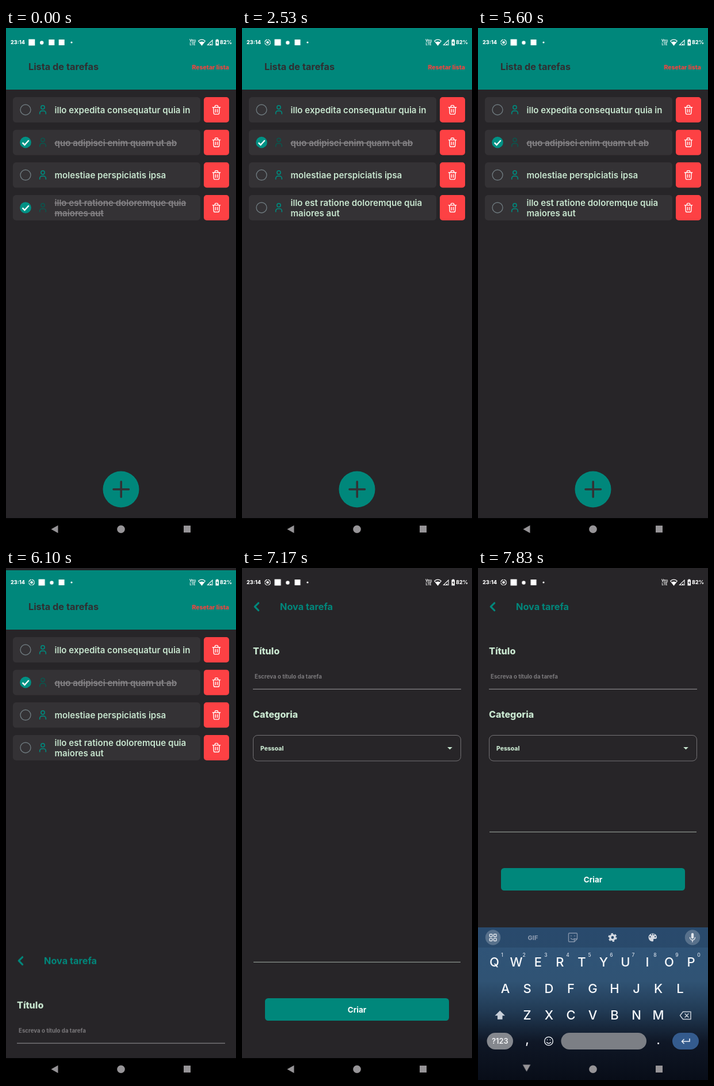
Animation of 400x889 px, one loop 8000 ms. Source, as an HTML page:

```html
<!DOCTYPE html>
<html lang="pt">
<head>
<meta charset="utf-8">
<title>Lista de tarefas</title>
<style>
  html, body { margin: 0; width: 100%; height: 100%; overflow: hidden; background: #272528; }
  svg { display: block; width: 100vw; height: 100vh; }
  text { font-family: Inter, "Open Sans", sans-serif; font-weight: 600; }
  .bold { font-weight: 700; }
  .heavy { font-weight: 800; }
  .mid { text-anchor: middle; }
  .teal { fill: #00877b; }
  .dark { fill: #272528; }
  .mint { fill: #c8e6cf; }
  .line { fill: none; stroke-linecap: round; stroke-linejoin: round; }
  .task { font-size: 15.1px; }
  .done .task { fill: #858386; text-decoration: line-through; }
  .open .task { fill: #c8e6cf; }
  .head { font-size: 16.3px; font-weight: 700; }
  .label { font-size: 16.1px; font-weight: 800; }
  .status { font-size: 9px; font-weight: 800; fill: #fff; }
  .key { font-size: 22px; font-weight: 500; fill: #f6f8fb; text-anchor: middle; }
  .num { font-size: 8.5px; font-weight: 500; fill: #d5dde8; text-anchor: middle; }

  .anim, .anim-box { animation: 8s linear infinite; }
  .anim-box { transform-box: fill-box; transform-origin: center; }

  /* status icons make room for a new one */
  .shift { animation-name: shift; }
  .appear { animation-name: appear; }
  .leave { animation-name: leave; }
  @keyframes shift {
    0%, .375% { transform: translateX(0); animation-timing-function: cubic-bezier(.4, 0, .2, 1); }
    6.6%, 100% { transform: translateX(17.3px); }
  }
  @keyframes appear {
    0%, .375% { transform: scale(0); opacity: 0; animation-timing-function: cubic-bezier(.4, 0, .2, 1); }
    6.6%, 100% { transform: scale(1); opacity: 1; }
  }
  @keyframes leave {
    0%, .375% { transform: none; opacity: 1; animation-timing-function: cubic-bezier(.4, 0, .2, 1); }
    6.6%, 100% { transform: translateX(17.3px) scale(.25); opacity: 0; }
  }

  /* last task is unchecked */
  .before { animation-name: before; }
  .after { animation-name: after; }
  @keyframes before { 0%, 31.62% { opacity: 1; } 31.625%, 100% { opacity: 0; } }
  @keyframes after { 0%, 31.62% { opacity: 0; } 31.625%, 100% { opacity: 1; } }

  /* form slides up */
  .slide { animation-name: slide; }
  .strip { animation-name: strip; }
  @keyframes slide {
    0%, 74.495% { transform: translateY(851px); animation-timing-function: cubic-bezier(.365, 0, .635, 1); }
    79.495%, 100% { transform: translateY(0); }
  }
  @keyframes strip {
    0%, 74.495% { transform: translateY(-14px); animation-timing-function: cubic-bezier(.365, 0, .635, 1); }
    79.495%, 100% { transform: translateY(0); }
  }

  /* keyboard opens */
  .resize { animation-name: resize; }
  .gap { animation-name: gap; }
  .caret { animation-name: caret; }
  .rise { animation-name: rise; }
  .fade { animation-name: fade; }
  .turn { animation-name: turn; }
  @keyframes resize { 0%, 90.4% { transform: translateY(226px); } 90.405%, 100% { transform: translateY(0); } }
  @keyframes gap { 0%, 90.4% { opacity: 0; } 90.405%, 100% { opacity: 1; } }
  @keyframes caret { 0%, 89.75% { opacity: 0; } 89.755%, 97.8% { opacity: 1; } 97.805%, 100% { opacity: 0; } }
  @keyframes rise {
    0%, 90.405% { transform: translateY(265px); animation-timing-function: cubic-bezier(0, 0, .2, 1); }
    92.905%, 100% { transform: translateY(0); }
  }
  @keyframes fade { 0%, 90.405% { opacity: 0; } 91.655%, 100% { opacity: 1; } }
  @keyframes turn {
    0%, 91.6% { transform: none; animation-timing-function: cubic-bezier(.4, 0, .2, 1); }
    94.1%, 100% { transform: translateY(-1.8px) rotate(-90deg); }
  }
</style>
</head>
<body>
<svg viewBox="0 0 400 889" preserveAspectRatio="none">
  <defs>
    <linearGradient id="sky" x1="0" y1="0" x2="0" y2="1">
      <stop offset="0" stop-color="#2f5479"/>
      <stop offset=".35" stop-color="#305374"/>
      <stop offset=".55" stop-color="#213a54"/>
      <stop offset=".75" stop-color="#0f1726"/>
      <stop offset="1" stop-color="#080d18"/>
    </linearGradient>
    <g id="person" class="line" stroke-width="1.7">
      <circle cx="64" cy="-4.3" r="3.1"/>
      <path d="M58.7 7v-1.2a4 4 0 0 1 4-4h2.6a4 4 0 0 1 4 4V7"/>
    </g>
    <g id="trash">
      <rect x="344" y="-22" width="44" height="44" rx="5" fill="#fd4144"/>
      <path class="line" stroke="#fff" stroke-width="1.4" d="M359.3-4.3h13.4M363.4-4.6v-1.6q0-1.4 1.4-1.4h2.4q1.4 0 1.4 1.4v1.6M360.8-4l.5 9.7q.1 1.9 2 1.9h5.4q1.9 0 2-1.9l.5-9.7M364.4-.8v5M367.6-.8v5"/>
    </g>
    <circle id="off" cx="34" r="9" fill="none" stroke="#6d787d" stroke-width="1.4"/>
    <g id="on">
      <circle cx="34" r="9.8" fill="#009184"/>
      <path d="M28.6.4l3.8 3.9 7.3-8" fill="none" stroke="#fff" stroke-width="2.4"/>
    </g>
  </defs>

  <!-- list -->
  <rect class="dark" width="400" height="889"/>
  <rect class="teal" width="400" height="107"/>
  <text x="39" y="73" class="head" fill="#302e31">Lista de tarefas</text>
  <text x="388" y="72" text-anchor="end" font-size="10.5" class="heavy" fill="#f0443f">Resetar lista</text>
  <g id="list"></g>
  <circle class="teal" cx="200" cy="801" r="31.5"/>
  <path class="line" stroke="#333134" stroke-width="3.6" d="M187 801h26.5M200.2 787.8v26.5"/>
  <rect class="dark anim strip" width="400" height="14"/>

  <!-- form -->
  <g class="anim slide">
    <rect class="dark" width="400" height="851"/>
    <path class="line" stroke="#00877b" stroke-width="3.2" d="M28.6 60.8l-6.4 6.4 6.4 6.4"/>
    <text x="66" y="73" class="head teal">Nova tarefa</text>
    <text x="19" y="150" class="label mint">Título</text>
    <text x="22" y="192" font-size="9.7" class="bold" fill="#7b797c">Escreva o título da tarefa</text>
    <rect class="anim caret" x="22" y="181.5" width="1.5" height="13" fill="#3f88b0"/>
    <path d="M19 210.4h362" stroke="#858386" stroke-width="1.4"/>
    <text x="19" y="260" class="label mint">Categoria</text>
    <rect x="19.5" y="290.5" width="361" height="44.5" rx="7.5" fill="none" stroke="#757376"/>
    <text x="32" y="317" font-size="10.4" class="heavy mint">Pessoal</text>
    <path class="mint" d="M357.2 311h8.6l-4.3 4.2z"/>
    <g class="anim resize">
      <path d="M20 458.4h360" stroke="#8b948d" stroke-width="1.3"/>
      <rect class="teal" x="40" y="521" width="320" height="39" rx="5.5"/>
      <text x="200" y="546" class="mid bold" font-size="13.4" fill="#fff">Criar</text>
    </g>
  </g>
  <rect class="anim gap" y="624" width="400" height="227" fill="#fffdff"/>
  <rect y="851" width="400" height="38"/>

  <!-- keyboard -->
  <g class="anim rise"><g class="anim fade">
    <rect y="624" width="400" height="265" fill="url(#sky)"/>
    <rect y="624" width="400" height="35" fill="#1c3452" opacity=".3"/>
    <g fill="#fff" fill-opacity=".22"><circle cx="26" cy="641.5" r="13.2"/><circle cx="373" cy="641.5" r="13.2"/></g>
    <g class="line" stroke="#e2e6ec" stroke-width="1.4">
      <rect x="20.2" y="635.7" width="4.6" height="4.6" rx="1"/><rect x="27.4" y="635.7" width="4.6" height="4.6" rx="1"/>
      <rect x="20.2" y="642.9" width="4.6" height="4.6" rx="1"/><rect x="27.4" y="642.9" width="4.6" height="4.6" rx="1"/>
      <path d="M368.5 641.5a4.5 4.5 0 0 0 9 0M373 646.3v3"/>
    </g>
    <rect x="370.8" y="633.8" width="4.4" height="10" rx="2.2" fill="#e2e6ec"/>
    <text x="95.5" y="645.5" class="mid heavy" font-size="11" fill="#8494aa">GIF</text>
    <path class="line" stroke="#8494aa" stroke-width="1.4" d="M159 634h12q1.5 0 1.5 1.5v8.500l-5 5h-8.500q-1.5 0-1.5-1.5v-12q0-1.5 1.5-1.5zM172 644h-3.500q-1 0-1 1v3.500M161.500 643q3 3.500 6 .5M162 638.500v.6M168 638.500v.6"/>
    <circle cx="234" cy="641.5" r="4.1" fill="none" stroke="#d5dae2" stroke-width="3.4"/>
    <circle cx="234" cy="641.5" r="6.5" fill="none" stroke="#d5dae2" stroke-width="2.2" stroke-dasharray="3.403"/>
    <path fill="#d5dae2" fill-rule="evenodd" d="M303.5 634.5a7 7 0 0 0 0 14q2 0 1.6-2.2-.6-2.3 1.4-2.3h2q2.500 0 2.500-3c0-4-3.500-6.500-7.500-6.500zM298.200 641.500h2.200v-2.200h-2.200zM301 637.600h2v-2h-2zM304.700 637.600h2v-2h-2zM307.200 641.300h2v-2.200h-2z"/>
    <g id="keys"></g>
    <path fill="#c9d0d9" d="M38.2 768.5l8.8 8.8h-4.5v6.5h-8.6v-6.5h-4.5z"/>
    <path class="line" stroke="#c9d0d9" stroke-width="1.5" d="M356.5 770.5h13.5v13h-13.5l-5-6.5zM360 774l6 6M366 774l-6 6"/>
    <rect x="15.5" y="807" width="45.5" height="29" rx="14.5" fill="#85888e"/>
    <text x="38.3" y="826" class="mid" font-size="12.8" fill="#f2f3f5">?123</text>
    <text x="85.5" y="826" class="key">,</text>
    <g class="line" stroke="#e2e6ec" stroke-width="1.5">
      <circle cx="123" cy="821.5" r="7.3"/>
      <path d="M119.5 823.5q3.5 4 7 0M120.5 819v.4M125.5 819v.4"/>
    </g>
    <rect x="144.5" y="807" width="148.5" height="29" rx="14.5" fill="#7c7f85"/>
    <text x="313.5" y="827" class="key">.</text>
    <rect x="338" y="807" width="46" height="29" rx="14.5" fill="#345b8d"/>
    <path class="line" stroke="#e8edf4" stroke-width="1.7" d="M368 817.5v4.5h-13.5M358 818.5l-3.5 3.5 3.5 3.5"/>
  </g></g>

  <!-- status bar -->
  <text x="8" y="28.3" class="status">23:14</text>
  <g class="anim-box appear">
    <circle cx="44.5" cy="25" r="4.7" fill="none" stroke="#fff" stroke-width="1.2" stroke-dasharray="6.2 1.18"/>
    <circle cx="44.5" cy="25" r="2.3" fill="#fff"/>
  </g>
  <g class="anim shift" fill="#fff">
    <rect x="39.3" y="19.5" width="11" height="11"/>
    <circle cx="62.2" cy="25.5" r="3.2"/>
    <rect x="74.3" y="20" width="10" height="10"/>
  </g>
  <rect class="anim-box leave" x="91.7" y="20" width="10" height="10" fill="#fff"/>
  <circle cx="114" cy="25" r="1.6" fill="#fff"/>
  <g fill="#fff">
    <text x="319" y="24.3" font-size="5.6" class="bold">Vo))</text>
    <text x="319.5" y="30.3" font-size="5.6" class="bold">LTE</text>
    <path d="M340.5 30l-5.8-7.5q5.8-4.7 11.6 0z" fill="none" stroke="#fff" stroke-width="1.1"/>
    <path d="M340.5 30l-4-5.3q4-2.5 8 0z"/>
    <path d="M350.5 29.5l8.5-8.5v8.5z" fill="none" stroke="#fff" stroke-width="1.1"/>
    <path d="M354 29.5l3-3v3z"/>
    <path fill-rule="evenodd" d="M366 19.5h2.6v1h1.4v10h-5.5v-10h1.5zM367.9 22.3l-2.2 3.7h1.3v2.8l2-3.7h-1.1z"/>
  </g>
  <text x="372" y="28.3" class="status">82%</text>

  <!-- navigation -->
  <g fill="#969497">
    <path class="anim-box turn" d="M78.500 870.200l12-6.700v13.400z"/>
    <circle cx="200" cy="870.2" r="6.8"/>
    <rect x="309" y="864" width="12" height="12"/>
  </g>
</svg>
<script>
  const tasks = [
    { lines: ['illo expedita consequatur quia in'], states: [['open', '']] },
    { lines: ['quo adipisci enim quam ut ab'], states: [['done', '']] },
    { lines: ['molestiae perspiciatis ipsa'], states: [['open', '']] },
    { lines: ['illo est ratione doloremque quia', 'maiores aut'],
      states: [['done', 'anim before'], ['open', 'anim after']] }
  ];

  const label = lines => lines.map((s, i) => {
    const y = lines.length > 1 ? -3 + 18 * i : 6;
    return `<text class="task" x="84.5" y="${y}">${s}</text>`;
  }).join('');

  const state = (lines, [kind, anim]) => `<g class="${kind} ${anim}">
    <use href="#${kind === 'done' ? 'on' : 'off'}"/>
    <use href="#person" stroke="${kind === 'done' ? '#0c544d' : '#00877b'}"/>
    ${label(lines)}</g>`;

  document.getElementById('list').innerHTML = tasks.map((t, i) => `
    <g transform="translate(0 ${142 + 56.65 * i})">
      <rect x="12" y="-22" width="326" height="44" rx="5.5" fill="#343235"/>
      <use href="#trash"/>
      ${t.states.map(s => state(t.lines, s)).join('')}
    </g>`).join('');

  const keyRow = (chars, x, y, cls) => [...chars].map((c, i) =>
    `<text class="${cls}" x="${x + 38 * i}" y="${y}">${c}</text>`).join('');

  document.getElementById('keys').innerHTML =
    keyRow('QWERTYUIOP', 28.5, 692, 'key') +
    keyRow('1234567890', 42, 675, 'num') +
    keyRow('ASDFGHJKL', 47.5, 738, 'key') +
    keyRow('ZXCVBNM', 85.5, 784, 'key');
</script>
</body>
</html>
```
